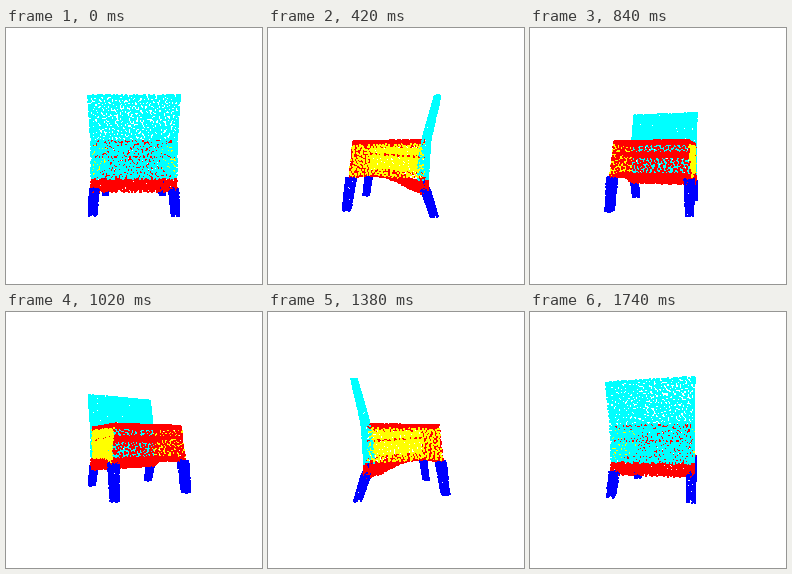
Animation of 256x256 px, one loop 1800 ms. Source, as a matplotlib script:

```python
import numpy as np
import matplotlib.pyplot as plt
from matplotlib.animation import FuncAnimation

SIZE, DPI = 256, 100
FRAMES, STEP_MS = 30, 60
CAMERA = 205
DENSITY = 0.27

CYAN, RED, YELLOW, BLUE = (0, 1, 1), (1, 0, 0), (1, 1, 0), (0, 0, 1)

rng = np.random.default_rng(4)
cloud, paint = [], []


def patch(color, surface, width, height, density=DENSITY):
    """Scatter evenly spread points over surface(u, v) -> x, y, z."""
    n = int(width * height * density)
    k = np.arange(n)
    jitter = rng.normal(0, 0.22 / np.sqrt(n), (2, n))
    u = (0.5 + k * 0.7548776662 + jitter[0]) % 1
    v = (0.5 + k * 0.5698402910 + jitter[1]) % 1
    x, y, z = np.broadcast_arrays(*surface(u, v))
    cloud.append(np.column_stack([x, y, z]))
    paint.append(np.tile(color, (n, 1)))


def mix(a, b, t):
    return a + (b - a) * t


def back_z(y):
    return np.interp(y, [-49, -40, -30, -13, 5, 20, 31],
                     [40, 38, 35.6, 32, 30.5, 30, 30.5])


def back_depth(y):
    return np.interp(y, [-49, -13, 20, 31], [4.5, 6.5, 8.5, 6])


def back_half(y):
    return np.interp(y, [-49, -13, 31], [37.2, 36.5, 36.5])


def rim(t):
    """Lower edge of the seat, front (0) to back (1)."""
    return np.interp(t, [0, 0.26, 0.48, 0.63, 0.81, 1],
                     [18.5, 16.2, 17.5, 21, 27, 31])


def seat_half(t, y):
    return mix(32 + 3 * (y + 13) / 32, 36.3, t)


def seat_z(t, y):
    return mix(-34 - 2.5 * (y + 13) / 32, 27, t)


def back_panel(color, y0, y1):
    for layer in (0, 1):
        def face(u, v):
            y = mix(y0, y1, v)
            return (2 * u - 1) * back_half(y), y, back_z(y) - layer * back_depth(y)
        patch(color, face, 73, y1 - y0)
    for side in (-1, 1):
        def edge(u, v):
            y = mix(y0, y1, v)
            return side * back_half(y), y, back_z(y) - u * back_depth(y)
        patch(color, edge, 7, y1 - y0)


def seat_side(side, color, top, bottom):
    def face(u, v):
        y = mix(top(u), bottom(u), v)
        return side * seat_half(u, y), y, seat_z(u, y)
    t = np.linspace(0, 1, 50)
    patch(color, face, 62, np.mean(bottom(t) - top(t)))


def seat_plane(color, height):
    def face(u, v):
        y = height(v)
        return (2 * u - 1) * seat_half(v, y), y, seat_z(v, y)
    patch(color, face, 68, 62)


def leg(side, top, foot):
    for axis in range(4):
        def face(u, v):
            r = mix(3.6, 2.8, v)
            a, b = (2 * u - 1) * r, r * (1 if axis % 2 else -1)
            dx, dz = (a, b) if axis < 2 else (b, a)
            x, y, z = (mix(p, q, v) for p, q in zip(top, foot))
            return side * x + dx, y, z + dz
        patch(BLUE, face, 7, foot[1] - top[1], 0.5)


def build():
    back_panel(CYAN, -49, 20)
    patch(CYAN, lambda u, v: ((2 * u - 1) * 37.2, -49, 40 - 4.5 * v), 74, 5)
    back_panel(RED, 20, 31)

    seat_plane(RED, lambda t: -13 + 0 * t)
    seat_plane(RED, lambda t: mix(-3, 1, t))
    seat_plane(RED, rim)

    def front(u, v):
        y = mix(-13, 18.5, v)
        return (2 * u - 1) * seat_half(0, y), y, seat_z(0, y)
    patch(RED, front, 67, 31.5)

    for side in (-1, 1):
        seat_side(side, RED, lambda t: -13 + 0 * t, lambda t: -10 + 0 * t)
        seat_side(side, YELLOW, lambda t: -10 + 0 * t,
                  lambda t: np.minimum(rim(t), 18))
        seat_side(side, RED, lambda t: np.minimum(rim(t), 18), rim)
        leg(side, (33, 18, -35), (33.5, 46.5, -39))
        leg(side, (34, 28, 28), (34.4, 49.5, 35))


build()
points, colors = np.vstack(cloud), np.vstack(paint)

fig = plt.figure(figsize=(SIZE / DPI, SIZE / DPI), dpi=DPI, facecolor="white")
ax = fig.add_axes([0, 0, 1, 1])
ax.set(xlim=(0, SIZE), ylim=(SIZE, 0))
ax.axis("off")


def dots(pixels, color):
    return ax.scatter(points[:, 0], points[:, 1], s=(pixels * 72 / DPI) ** 2,
                      marker="s", c=color, linewidths=0, antialiased=False)


halo = dots(2.9, "black")
body = dots(2.0, colors)


def update(i):
    a = 2 * np.pi * i / FRAMES
    x, y, z = points.T
    side = x * np.cos(a) + z * np.sin(a)
    near = z * np.cos(a) - x * np.sin(a)
    scale = CAMERA / (CAMERA - near)
    spots = np.column_stack([side * scale, y * scale]) + SIZE / 2
    order = np.argsort(near)
    halo.set_offsets(spots)
    body.set_offsets(spots[order])
    body.set_facecolors(colors[order])
    return halo, body


anim = FuncAnimation(fig, update, frames=FRAMES, interval=STEP_MS,
                     repeat=True, repeat_delay=0)
plt.show()
```
